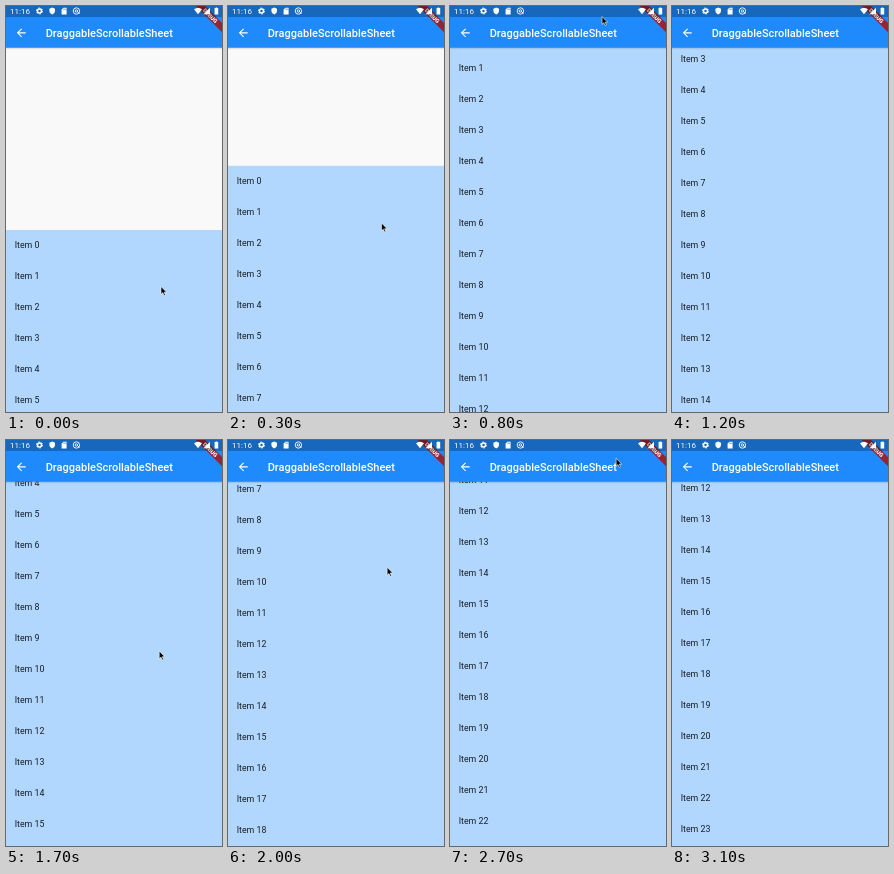
An HTML page that plays this animation: 216x406 px, repeating every 3200 ms.

```html
<!DOCTYPE html>
<html lang="en">
<head>
<meta charset="utf-8">
<title>DraggableScrollableSheet</title>
<style>
  html, body { margin: 0; width: 100%; height: 100%; overflow: hidden; background: #f9f9f9; }
  svg { display: block; width: 216px; height: 406px; }
  text { font-family: Roboto, sans-serif; }
  #items text { font-size: 8.8px; fill: #000; fill-opacity: .87; }
  #appbar { filter: drop-shadow(0 .8px 1.2px rgba(0, 0, 0, .35)); }
</style>
</head>
<body>
<svg viewBox="0 0 216 406">
  <rect width="216" height="406" fill="#f9f9f9"/>
  <g id="sheet">
    <rect width="216" height="900" fill="#b1d7ff"/>
    <g id="items"></g>
  </g>

  <rect id="appbar" x="-6" y="-6" width="228" height="47.7" fill="#1f8afc"/>
  <path transform="translate(8.6 20.2) scale(.5536)" fill="#fff"
        d="M20 11H7.83l5.59-5.59L12 4l-8 8 8 8 1.41-1.41L7.83 13H20z"/>
  <text x="39.7" y="30.8" font-size="11" font-weight="500" fill="#fff">DraggableScrollableSheet</text>

  <g transform="translate(217.5 -3.5) rotate(45)">
    <rect x="-30" y="15.5" width="60" height="6.6" fill="#952536"/>
    <text y="20.8" font-size="5.65" font-weight="900" text-anchor="middle" fill="#fff">DEBUG</text>
  </g>

  <rect width="216" height="11" fill="#000" fill-opacity=".25"/>
  <g fill="#fff">
    <text x="4" y="8" font-size="8">11:16</text>
    <circle cx="33.5" cy="5" r="2" fill="none" stroke="#fff" stroke-width="1.5"/>
    <circle cx="33.5" cy="5" r="3" fill="none" stroke="#fff" stroke-width="1" stroke-dasharray="1.57 1.57"/>
    <path d="M46.2 1.6l2.8 1.2v2.1q0 2.6-2.8 3.6q-2.8-1-2.8-3.6V2.8z"/>
    <path d="M57.4 1.8h3.2v6.6h-5V3.6z"/>
    <path d="M57.7 2.6v1.4M58.8 2.6v1.4M59.9 2.6v1.4" stroke="#1967b8" stroke-width=".5"/>
    <g fill="none" stroke="#fff" stroke-width=".9">
      <circle cx="70.4" cy="5" r="3.2"/>
      <circle cx="70.4" cy="5" r="1.2"/>
      <path d="M71.5 5.6l2 2"/>
    </g>
    <path d="M188 3.3q4-3 8 0l-4 5z"/>
    <path d="M204 1.7v6.6h-6.6z"/>
    <path d="M209.6 1.4h1.6v.7h1v6.4h-3.6V2.1h1z"/>
  </g>

  <path id="cursor" d="M0 0v7.8l1.8-1.6 1.3 2.8 1.3-.6-1.3-2.7h2.5z"
        fill="#000" stroke="#fff" stroke-width=".6" stroke-linejoin="round"/>
</svg>
<script>
  const LOOP = 3200, STEP = 100, ROW = 31, ROWS = 28;

  const items = document.getElementById('items');
  for (let i = 0; i < ROWS; i++) {
    const label = document.createElementNS('http://www.w3.org/2000/svg', 'text');
    label.setAttribute('x', 8.7);
    label.setAttribute('y', 18.4 + i * ROW);
    label.textContent = `Item ${i}`;
    items.append(label);
  }

  // Monotone cubic through [time, value] keys, at rest at both ends.
  function track(keys) {
    const secant = keys.slice(1).map(([t, v], i) => (v - keys[i][1]) / (t - keys[i][0]));
    const slope = keys.map((_, i) => {
      const a = secant[i - 1], b = secant[i];
      return a * b > 0 ? 2 * a * b / (a + b) : 0;
    });
    return time => {
      let i = 0;
      while (i < keys.length - 2 && time >= keys[i + 1][0]) i++;
      const [t0, v0] = keys[i], [t1, v1] = keys[i + 1];
      const span = t1 - t0, u = Math.min(1, (time - t0) / span), w = 1 - u;
      return v0 * w * w * (1 + 2 * u) + v1 * u * u * (3 - 2 * u)
        + span * u * w * (slope[i] * w - slope[i + 1] * u);
    };
  }

  const sheetTop = track([[0, 224], [600, 61.5], [1200, -55.7], [1700, -96.8],
    [2300, -274.5], [2700, -316.5], [3100, -339.5]]);
  const cursorX = track([[0, 155], [600, 152], [1700, 153.2], [2300, 165.2], [3100, 166.5]]);
  const cursorY = track([[0, 280.5], [600, 103.5], [900, -12], [1200, -12],
    [1600, 225], [1700, 211], [2300, 52], [2700, 18.4], [3000, -12]]);

  const sheet = document.getElementById('sheet');
  const cursor = document.getElementById('cursor');
  const place = (node, x, y) => node.setAttribute('transform', `translate(${x} ${y})`);

  function draw() {
    const time = Math.floor(performance.now() % LOOP / STEP) * STEP;
    place(sheet, 0, sheetTop(time));
    place(cursor, cursorX(time), cursorY(time));
    requestAnimationFrame(draw);
  }
  draw();
</script>
</body>
</html>
```
